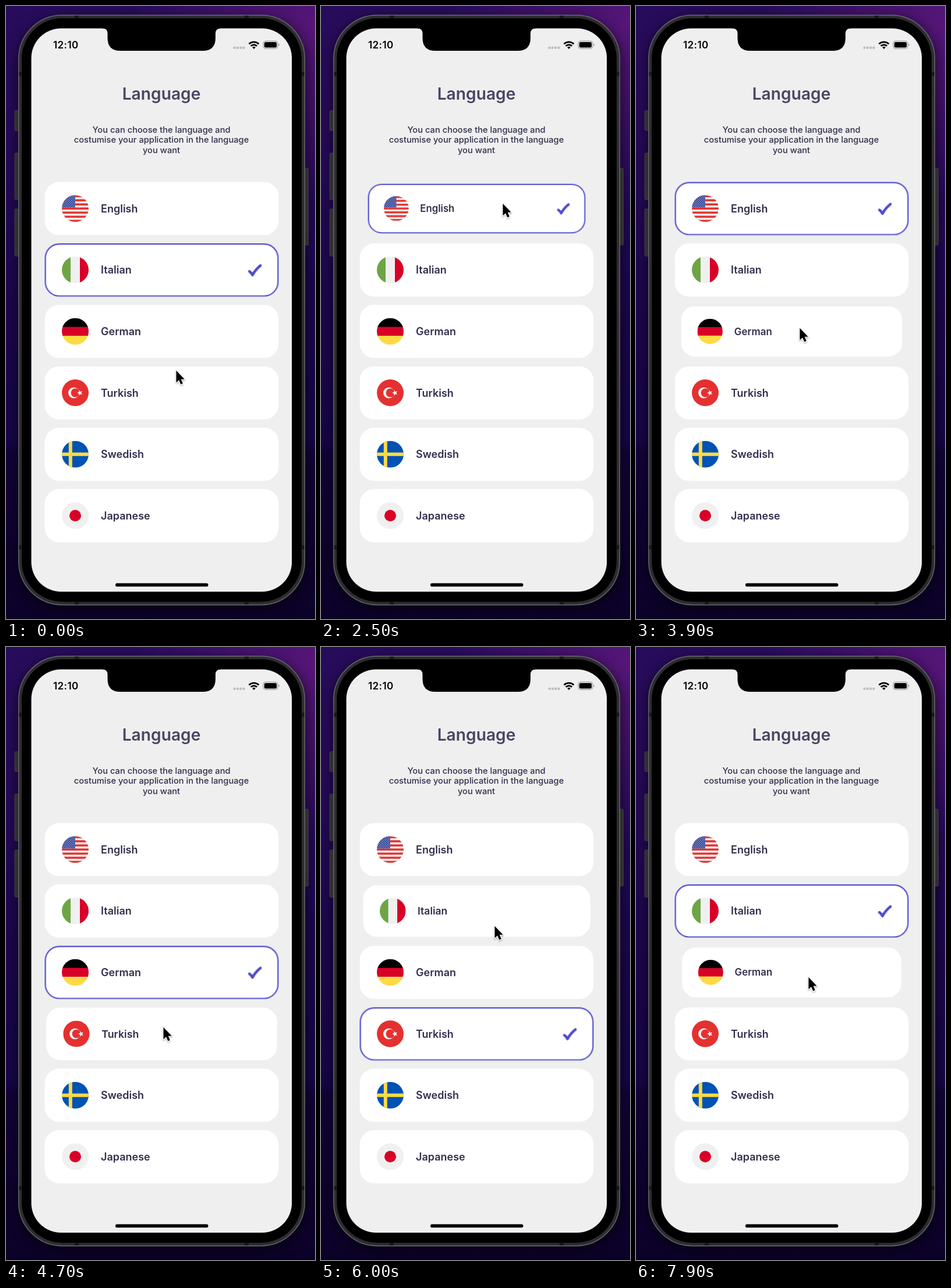
These frames come from a looping animation (531 px wide and 1054 px high, 8 s). An HTML page:

```html
<!DOCTYPE html>
<html lang="en">
<head>
<meta charset="utf-8">
<title>Language picker</title>
<style>
html, body { margin: 0; width: 100%; height: 100%; overflow: hidden; background: #12052f; }
svg { display: block; width: 531px; height: 1054px; }
text { font-family: Inter, Roboto, sans-serif; fill: #302f4c; }
.title { font-size: 28.2px; font-weight: 600; fill: #474663; text-anchor: middle; }
.note { font-size: 14.7px; font-weight: 500; text-anchor: middle; }
.clock { font-size: 17px; font-weight: 600; letter-spacing: .4px; fill: #000; }
.card text { font-size: 18px; font-weight: 600; }

.card, .sel, #cursor { animation: 8s step-end -10ms infinite; }
.card { transform-box: fill-box; transform-origin: center; }
.sel { opacity: 0; }
.en .card { animation-name: press-en; }
.it .card { animation-name: press-it; }
.de .card { animation-name: press-de; }
.tr .card { animation-name: press-tr; }
.en .sel { animation-name: pick-en; }
.it .sel { animation-name: pick-it; }
.de .sel { animation-name: pick-de; }
.tr .sel { animation-name: pick-tr; }
#cursor { animation-name: point; }

@keyframes press-en {
  0% { transform: scale(1); }
  17.5% { transform: scale(.965); }
  22.5% { transform: scale(.965); animation-timing-function: steps(4); }
  27.5% { transform: scale(.93); }
  31.25% { transform: scale(.93); animation-timing-function: steps(5); }
  37.5%, 100% { transform: scale(1); }
}
@keyframes press-de {
  0% { transform: scale(1); }
  45% { transform: scale(.975); }
  46.25% { transform: scale(.975); animation-timing-function: steps(3); }
  50% { transform: scale(.93); }
  51.25% { transform: scale(.93); animation-timing-function: steps(4); }
  56.25% { transform: scale(1); }
  96.25% { transform: scale(.985); }
  97.5% { transform: scale(.955); }
  98.75%, 100% { transform: scale(.937); }
}
@keyframes press-tr {
  0% { transform: scale(1); }
  58.75% { transform: scale(.987); animation-timing-function: steps(3); }
  62.5% { transform: scale(.93); }
  63.75% { transform: scale(.93); animation-timing-function: steps(4); }
  68.75%, 100% { transform: scale(1); }
}
@keyframes press-it {
  0% { transform: scale(1); }
  75% { transform: scale(.971); animation-timing-function: steps(4); }
  80% { transform: scale(.93); }
  85% { transform: scale(.985); }
  87.5%, 100% { transform: scale(1); }
}
@keyframes pick-en { 0%, 51.25%, 100% { opacity: 0; } 31.25% { opacity: 1; } }
@keyframes pick-de { 0%, 63.75%, 100% { opacity: 0; } 51.25% { opacity: 1; } }
@keyframes pick-tr { 0%, 85%, 100% { opacity: 0; } 63.75% { opacity: 1; } }
@keyframes pick-it { 0%, 85%, 100% { opacity: 1; } 31.25% { opacity: 0; } }
@keyframes point {
  0% { transform: translate(292px, 626px); animation-timing-function: steps(6); }
  7.5% { transform: translate(303px, 480px); }
  8.75% { transform: translate(303px, 480px); animation-timing-function: steps(5); }
  15% { transform: translate(312px, 339px); }
  31.25% { transform: translate(312px, 339px); animation-timing-function: steps(3); }
  35% { transform: translate(318px, 395px); animation-timing-function: steps(4); }
  40% { transform: translate(288px, 521px); }
  41.25% { transform: translate(282px, 552px); }
  42.5% { transform: translate(281px, 553px); }
  51.25% { transform: translate(281px, 553px); animation-timing-function: steps(5); }
  57.5% { transform: translate(270px, 653px); }
  63.75% { transform: translate(270px, 653px); animation-timing-function: steps(4); }
  68.75% { transform: translate(288px, 508px); animation-timing-function: steps(3); }
  72.5% { transform: translate(298px, 479px); }
  88.75% { transform: translate(298px, 479px); animation-timing-function: steps(7); }
  97.5%, 100% { transform: translate(296px, 567px); }
}
</style>
</head>
<body>
<svg viewBox="0 0 531 1054">
  <defs>
    <linearGradient id="sky" x2="0" y2="1">
      <stop offset="0" stop-color="#280c5c"/>
      <stop offset=".2" stop-color="#270a5a"/>
      <stop offset=".45" stop-color="#1d0750"/>
      <stop offset=".71" stop-color="#180548"/>
      <stop offset=".73" stop-color="#130339"/>
      <stop offset="1" stop-color="#0c0228"/>
    </linearGradient>
    <radialGradient id="glow" gradientUnits="userSpaceOnUse" cx="531" cy="30" r="310">
      <stop offset="0" stop-color="#561678"/>
      <stop offset="1" stop-color="#561678" stop-opacity="0"/>
    </radialGradient>
    <filter id="blur" x="-20%" y="-20%" width="140%" height="140%"><feGaussianBlur stdDeviation="11"/></filter>
    <filter id="soft" x="-50%" y="-50%" width="200%" height="200%">
      <feDropShadow dx="0" dy="1.2" stdDeviation="1.1" flood-opacity=".4"/>
    </filter>
    <clipPath id="round"><circle cx="23" cy="23" r="23"/></clipPath>
    <pattern id="stripes" width="46" height="7.08" patternUnits="userSpaceOnUse">
      <rect width="46" height="3.54" fill="#e5332f"/>
    </pattern>
    <pattern id="stars" width="4" height="4" patternUnits="userSpaceOnUse">
      <circle cx="1" cy="1" r=".75" fill="#eef"/><circle cx="3" cy="3" r=".75" fill="#eef"/>
    </pattern>
    <rect id="plate" width="402" height="91.6" rx="25" fill="#fff"/>
    <g id="mark" fill="none" stroke="#504bcd">
      <rect x="1.1" y="1.1" width="399.8" height="89.4" rx="24" stroke-width="2.2"/>
      <path d="M351.8 48.2q3.2 2.2 5.3 6.2 5-9.4 13.6-16.2" stroke-width="4.6" stroke-linecap="round" stroke-linejoin="round"/>
    </g>
  </defs>

  <rect width="531" height="1054" fill="url(#sky)"/>
  <rect width="531" height="1054" fill="url(#glow)"/>
  <rect y="1052" width="531" height="2" fill="#07011a"/>
  <rect x="18" y="20" width="500" height="1016" rx="76" opacity=".5" filter="url(#blur)"/>

  <!-- phone -->
  <g fill="#2f2f31" stroke="#47474a" stroke-width=".8">
    <rect x="15" y="180" width="9" height="34" rx="1.5"/>
    <rect x="15" y="253" width="9" height="80" rx="1.5"/>
    <rect x="15" y="349" width="9" height="81" rx="1.5"/>
    <rect x="511" y="279" width="8.5" height="132" rx="1.5"/>
  </g>
  <rect x="21.7" y="15.7" width="491.6" height="1014" rx="75" fill="#2d2d2f" stroke="#6a6a6d" stroke-width="1.4"/>
  <path d="M118 18.5h7M410 18.5h7M118 1027h7M410 1027h7M24.5 113v7M510.5 113v7M24.5 927v7M510.5 927v7" stroke="#171718" stroke-width="4"/>
  <rect x="27" y="21" width="481" height="1003.4" rx="70"/>
  <rect x="43.5" y="38.5" width="447.7" height="968.5" rx="51" fill="#efefef"/>
  <path d="M166 38h203v.5q-9 0-9 9V55q0 22-22 22H196.500q-22 0-22-22V47.500q0-9-8.500-9z"/>
  <rect x="188" y="992.600" width="159.500" height="5.600" rx="2.800"/>

  <!-- status bar -->
  <text class="clock" x="81" y="73">12:10</text>
  <g fill="#bdbdbf">
    <circle cx="392.600" cy="71.700" r="2.200"/><circle cx="397.900" cy="71.700" r="2.200"/>
    <circle cx="403.200" cy="71.700" r="2.200"/><circle cx="408.500" cy="71.700" r="2.200"/>
  </g>
  <g fill="none" stroke="#000" stroke-width="2.700">
    <path d="M417.500 65.200a12.300 12.300 0 0 1 17 0M420.700 68.700a7.600 7.600 0 0 1 10.600 0"/>
    <path d="M426 74l-2.800-2.900a4 4 0 0 1 5.600 0z" fill="#000" stroke="none"/>
  </g>
  <rect x="442" y="60.200" width="25" height="13.200" rx="4" fill="none" stroke="#929294"/>
  <rect x="443.800" y="62" width="21.400" height="9.600" rx="2.400"/>
  <path d="M468.500 64.600q3 2.200 0 4.500z" fill="#929294"/>

  <!-- heading -->
  <text class="title" x="267" y="161">Language</text>
  <text class="note" x="267" y="217.500">You can choose the language and</text>
  <text class="note" x="267" y="235.300">costumise your application in the language</text>
  <text class="note" x="267" y="253.200">you want</text>

  <!-- language cards -->
  <g class="en" transform="translate(66.500 302.500)"><g class="card">
    <use href="#plate"/>
    <g transform="translate(29.500 22.700)" clip-path="url(#round)">
      <path fill="#f0f0f0" d="M0 0h46v46H0z"/>
      <path fill="url(#stripes)" d="M0 0h46v46H0z"/>
      <path fill="#2f3f92" d="M0 0h23v21.200H0z"/>
      <path fill="url(#stars)" d="M0 0h23v21.200H0z"/>
    </g>
    <text x="96.500" y="52.200">English</text>
    <use class="sel" href="#mark"/>
  </g></g>

  <g class="it" transform="translate(66.500 408.100)"><g class="card">
    <use href="#plate"/>
    <g transform="translate(29.500 22.700)" clip-path="url(#round)">
      <path fill="#f0f0f0" d="M0 0h46v46H0z"/>
      <path fill="#6da544" d="M0 0h15v46H0z"/>
      <path fill="#d80027" d="M31 0h15v46H31z"/>
    </g>
    <text x="96.500" y="52.200">Italian</text>
    <use class="sel" href="#mark"/>
  </g></g>

  <g class="de" transform="translate(66.500 513.700)"><g class="card">
    <use href="#plate"/>
    <g transform="translate(29.500 22.700)" clip-path="url(#round)">
      <path d="M0 0h46v16H0z"/>
      <path fill="#d80027" d="M0 15.300h46v16H0z"/>
      <path fill="#ffda44" d="M0 30.700h46V46H0z"/>
    </g>
    <text x="96.500" y="52.200">German</text>
    <use class="sel" href="#mark"/>
  </g></g>

  <g class="tr" transform="translate(66.500 619.400)"><g class="card">
    <use href="#plate"/>
    <g transform="translate(29.500 22.700)" clip-path="url(#round)">
      <path fill="#e53030" d="M0 0h46v46H0z"/>
      <circle cx="20.500" cy="23" r="9.400" fill="#fff"/>
      <circle cx="23" cy="23" r="7.500" fill="#e53030"/>
      <path fill="#fff" d="M26 23l3.400-1.200.1-3.600 2.200 2.900 3.400-1-2 3 2 3-3.400-1-2.200 2.900-.1-3.600z"/>
    </g>
    <text x="96.500" y="52.200">Turkish</text>
    <use class="sel" href="#mark"/>
  </g></g>

  <g transform="translate(66.500 725)"><g class="card">
    <use href="#plate"/>
    <g transform="translate(29.500 22.700)" clip-path="url(#round)">
      <path fill="#0052b4" d="M0 0h46v46H0z"/>
      <path fill="#ffda44" d="M11.800 0h6v20H46v6H17.800v20h-6V26H0v-6h11.800z"/>
    </g>
    <text x="96.500" y="52.200">Swedish</text>
  </g></g>

  <g transform="translate(66.500 830.600)"><g class="card">
    <use href="#plate"/>
    <g transform="translate(29.500 22.700)" clip-path="url(#round)">
      <path fill="#f0f0f0" d="M0 0h46v46H0z"/>
      <circle cx="23" cy="23" r="10" fill="#d80027"/>
    </g>
    <text x="96.500" y="52.200">Japanese</text>
  </g></g>

  <g id="cursor">
    <path d="M.5 .8V21.500L5.200 17.200 8.300 24.600 11.900 23.100 8.800 15.700H14.800z" stroke="#fff" stroke-width="2.400" stroke-linejoin="round" paint-order="stroke" filter="url(#soft)"/>
  </g>
</svg>
</body>
</html>
```
